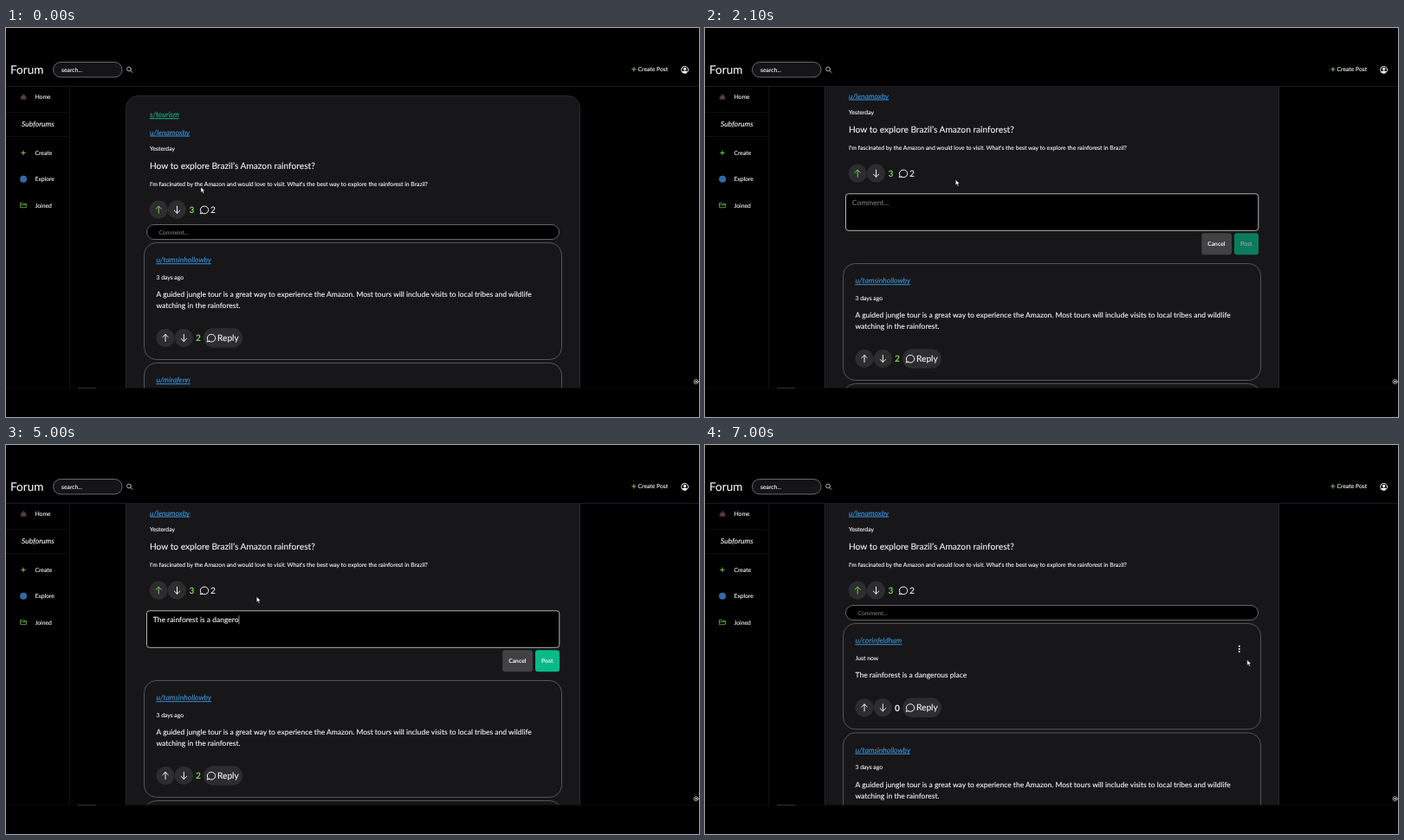
Recreate the animation shown at these times as an HTML page. Size 800 by 450 pixels, loop 7.1 s.

```html
<!DOCTYPE html>
<html lang="en">
<head>
<meta charset="utf-8">
<title>Forum</title>
<style>
  html, body { margin: 0; width: 100%; height: 100%; overflow: hidden; background: #000; }
  svg { display: block; width: 800px; height: 450px; }
  text {
    font: 6.79px Lato, sans-serif; color: #f4f4f4; white-space: pre;
    fill: currentColor; stroke: currentColor; stroke-width: .12; text-rendering: geometricPrecision;
  }
  .body { font-size: 8.49px; }
  .title { font-size: 10.19px; }
  .brand { font-size: 13.58px; }
  .bold { font-weight: 700; stroke: none; }
  .italic { font-size: 8.49px; font-style: italic; }
  .link { text-decoration: underline; color: #3c93d6; }
  .sub { color: #12b886; }
  .hint { color: #777; }
  .score { color: #7bd555; }
  .line { fill: none; stroke: #f4f4f4; stroke-width: 1; stroke-linecap: round; stroke-linejoin: round; }
  .thin { stroke-width: .7; }
  .green { stroke: #6fd04c; }
  .box { fill: none; stroke: #555457; }
  .round { fill: #2d2c2f; }
  .rule { stroke: #111113; }
</style>
</head>
<body>
<svg id="stage" viewBox="0 0 800 450"></svg>
<script>
const LOOP = 7100, STEP = 100;
const OPEN = 1500, TYPE = 2400, SENT = 6700, SCROLL = 42;
const MESSAGE = 'The rainforest is a dangerous place';
const TYPED = TYPE + (MESSAGE.length - 1) * 100;

// Cursor stops: time, x, y
const POINTER = [
  [0, 225, 184], [150, 225, 184], [600, 288.8, 218.3], [900, 288.8, 218.3],
  [1400, 289, 190], [1500, 289, 190], [1700, 289.3, 175.5],
  [6000, 289.3, 175.5], [6600, 625.8, 248.5], [LOOP, 625.8, 248.5]
];

const text = (x, y, content, style = '') => `<text x="${x}" y="${y}" class="${style}">${content}</text>`;
const path = (x, y, d, style = '') => `<path class="line ${style}" transform="translate(${x} ${y})" d="${d}"/>`;
const rect = (x, y, w, h, r, attrs) => `<rect x="${x}" y="${y}" width="${w}" height="${h}" rx="${r}" ${attrs}/>`;
const plus = (x, y) => path(x, y, 'M-2.2 0H2.2M0-2.2V2.2', 'green');
const bubble = (x, y) => path(x, y, 'M-2.6 3.9L-4.8 4.6-4 2.5A4.7 4.4 0 1 1-2.6 3.9Z');

const votes = (x, y, up = '') =>
  `<circle class="round" cx="${x}" cy="${y}" r="10.6"/><circle class="round" cx="${x + 21.3}" cy="${y}" r="10.6"/>` +
  path(x, y, 'M0 4V-4M-3.2-.9L0-4 3.2-.9', up) +
  path(x + 21.3, y, 'M0-4V4M-3.2 .9L0 4 3.2 .9');

function comment(y, name, age, lines, score, scoreStyle) {
  const height = 109.6 + 12.7 * lines.length, row = y + height - 25;
  return rect(159.5, y, 482, height, 14, 'class="box"') +
    text(173.5, y + 22.8, name, 'italic link') +
    text(173.5, y + 42.2, age) +
    lines.map((line, i) => text(173.5, y + 62.9 + i * 12.7, line, 'body')).join('') +
    votes(184, row) + text(219, row + 3.7, score, 'title bold ' + scoreStyle) +
    rect(228, row - 11.2, 45, 22.4, 11.2, 'class="round"') +
    bubble(237, row) + text(244, row + 3.6, 'Reply', 'title');
}

const post =
  rect(138.5, 78.5, 524, 700, 14, 'fill="#171619" stroke="#29282b"') +
  text(166, 103.3, 's/tourism', 'italic link sub') +
  text(166, 123.6, 'u/lenamoxby', 'italic link') +
  text(166, 142.2, 'Yesterday') +
  text(166, 163.4, 'How to explore Brazil’s Amazon rainforest?', 'title') +
  text(166, 183.4, "I'm fascinated by the Amazon and would love to visit. What's the best way to explore the rainforest in Brazil?") +
  votes(176.2, 210.2, 'green') + text(211.4, 214, '3', 'title bold score') +
  bubble(229, 210.2) + text(236, 213.9, '2', 'title');

const prompt =
  rect(162.5, 227.5, 476, 17, 8.5, 'fill="#000" stroke="#656468"') +
  text(176.5, 238.7, 'Comment...', 'hint');

const editor =
  rect(162.5, 233.8, 476.3, 42.5, 3, 'fill="#000" stroke="#ddd" stroke-width=".8"') +
  '<text id="draft" x="169.8" y="247.2" class="body"></text>' +
  '<path id="caret" d="M0 239.2V249.4" stroke="#ccc" stroke-width=".7"/>' +
  rect(573.2, 279.2, 34.8, 25, 3, 'fill="#424144"') + text(580.2, 294.2, 'Cancel', 'bold') +
  '<g id="submit">' + rect(611, 279.2, 28, 25, 3, 'fill="#05bb88"') + text(618, 294.2, 'Post', 'bold') + '</g>';

const replies =
  comment(248.5, 'u/tamsinhollowby', '3 days ago', [
    'A guided jungle tour is a great way to experience the Amazon. Most tours will include visits to local tribes and wildlife',
    'watching in the rainforest.'], 2, 'score') +
  comment(387.5, 'u/mirafenn', '2 minutes ago', ["Brazil's Amazon rainforest is fascinating!"], 1, 'score');

const mine = comment(248.5, 'u/corinfeldham', 'Just now', [MESSAGE], 0, '') +
  [274.8, 277.9, 281].map(y => `<circle cx="616.8" cy="${y}" r="1" fill="#fff"/>`).join('');

const header =
  '<path d="M0 67.5H800" stroke="#171a2c"/>' +
  text(5, 53, 'Forum', 'brand') +
  rect(54.5, 39.5, 79.5, 17.4, 8.7, 'fill="#151417" stroke="#69686b"') +
  text(64, 50.6, 'search...') +
  path(142, 47.5, 'M1.8 1.8L4 4M2.4 0A2.4 2.4 0 1 1-2.4 0A2.4 2.4 0 1 1 2.4 0', 'thin') +
  plus(724.9, 47.8) + text(729.6, 50.2, 'Create Post') +
  '<circle cx="783.6" cy="48.4" r="4" class="line"/><circle cx="783.6" cy="47.3" r="1.6" fill="#fff"/>' +
  '<path d="M780.6 50.6Q783.6 48.6 786.6 50.6Q783.6 54 780.6 50.6Z" fill="#fff"/>';

const sidebar =
  '<path class="rule" d="M73.5 68V416M0 97.8H73M0 125.5H73"/>' +
  '<path d="M16.8 79.2L20.2 76 23.6 79.2V83H16.8Z" fill="#3d302f"/><path d="M18.6 79.5H22V81H18.6Z" fill="#77504a"/>' +
  text(33.5, 82, 'Home') + text(18, 113.6, 'Subforums', 'italic') +
  plus(20, 144.4) + text(33.5, 147, 'Create') +
  '<circle cx="20.1" cy="174.8" r="4" fill="#3568a6"/>' + text(33.5, 177.3, 'Explore') +
  path(20.1, 205, 'M-3.2-2.6H-.8L0-1.7H3.3V2.7H-3.2ZM-3-.4H3', 'green thin') + text(33.5, 207.6, 'Joined');

const $ = id => document.getElementById(id);

$('stage').innerHTML =
  '<clipPath id="view"><path d="M0 68H800V416.5H0Z"/></clipPath>' +
  `<g clip-path="url(#view)"><g id="page">${post}<g id="prompt">${prompt}</g><g id="editor">${editor}</g>` +
  `<g id="mine">${mine}</g><g id="replies">${replies}</g></g></g>` +
  header + sidebar +
  '<path d="M0 416.8H800" stroke="#101012" stroke-width=".7"/><path d="M83 416.6H104" stroke="#333"/>' +
  '<circle cx="796.6" cy="409.2" r="2.5" class="line thin"/><circle cx="796.6" cy="409.2" r="1" fill="#fff"/>' +
  '<path id="pointer" d="M0 0V6.3L1.5 5 2.6 7.4 3.7 6.9 2.6 4.6H4.5Z" fill="#fff" stroke="#000" stroke-width=".4"/>';

const ease = (t, from, to) => {
  const p = Math.min(1, Math.max(0, (t - from) / (to - from)));
  return p * p * (3 - 2 * p);
};
const show = (id, on) => $(id).style.display = on ? '' : 'none';
const move = (id, x, y) => $(id).setAttribute('transform', `translate(${x} ${y})`);

function draw(t) {
  const editing = t >= OPEN && t < SENT, sent = t >= SENT;
  move('page', 0, -SCROLL * ease(t, 150, 500));
  move('replies', 0, editing ? 66 : sent ? 126.5 : 0);
  show('prompt', !editing);
  show('editor', editing);
  show('mine', sent);

  const count = Math.max(0, Math.floor((t - TYPE) / 100) + 1);
  const draft = $('draft');
  draft.textContent = count ? MESSAGE.slice(0, count) : 'Comment...';
  draft.classList.toggle('hint', !count);
  $('submit').setAttribute('opacity', count ? 1 : .62);
  if (editing) move('caret', 170.2 + (count ? draft.getComputedTextLength() : 0), 0);
  const idle = t < TYPE ? t - OPEN : Math.max(0, t - TYPED);
  show('caret', idle % 1000 < 500);

  const next = POINTER.findIndex(stop => stop[0] > t);
  const [from, x0, y0] = POINTER[next - 1], [to, x1, y1] = POINTER[next];
  const p = ease(t, from, to);
  move('pointer', x0 + (x1 - x0) * p, y0 + (y1 - y0) * p);
}

const start = performance.now();
function tick() {
  const t = (performance.now() - start) % LOOP;
  draw(Math.floor(t / STEP) * STEP);
  requestAnimationFrame(tick);
}
tick();
</script>
</body>
</html>
```
